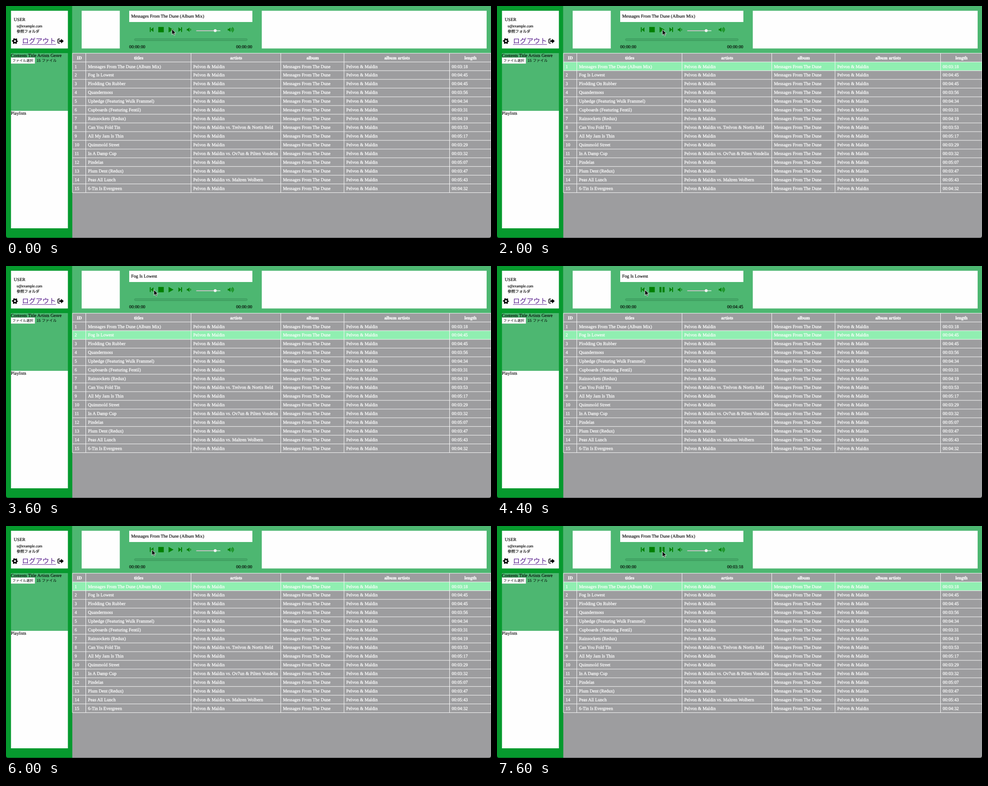
Recreate the animation shown at these times as an HTML page. Size 1000 by 478 pixels, loop 7.7 s.

```html
<!DOCTYPE html>
<html lang="ja">
<head>
<meta charset="utf-8">
<title>Music player</title>
<style>
  html, body { margin: 0; width: 100%; height: 100%; overflow: hidden; background: #9d9d9f; }
  svg { display: block; width: 100vw; height: 100vh; }
  text {
    font: 9.36px "Liberation Serif", "Noto Sans CJK JP", "Noto Sans CJK", serif;
    text-rendering: geometricPrecision;
    white-space: pre;
    stroke: #000;
    stroke-width: .15;
  }
  .small { font-size: 7.8px; }
  .link { font-size: 14.04px; font-weight: 300; fill: #551a8b; stroke: none; }
  .ui { font-family: "Liberation Sans", "Noto Sans CJK JP", "Noto Sans CJK", sans-serif; font-size: 7.7px; stroke: none; }
  #table text { fill: #fff; stroke: #fff; stroke-width: .25; }
  #table .head { font-weight: bold; text-anchor: middle; }
  #icons { fill: #008000; }
  #cursor { animation: move 7.7s infinite ease-in-out; }
  @keyframes move {
    0%     { transform: translate(342px, 47.5px); }
    13%    { transform: translate(341px, 48.5px); }
    29.9%  { transform: translate(341px, 48.5px); }
    35%    { transform: translate(357px, 50.5px); }
    39%    { transform: translate(357px, 50.5px); }
    45.5%  { transform: translate(305px, 49px); }
    58.4%  { transform: translate(305px, 49px); }
    67.5%  { transform: translate(301.5px, 48.5px); }
    87%    { transform: translate(300px, 49px); }
    91%    { transform: translate(300px, 49px); }
    97.4%, 100% { transform: translate(341px, 52px); }
  }
</style>
</head>
<body>
<svg viewBox="0 0 1000 478" preserveAspectRatio="none">
  <rect width="1000" height="478" fill="#9d9d9f"/>
  <rect width="136.7" height="478" fill="#069a2e"/>
  <rect x="136.7" width="863.3" height="97" fill="#4db771"/>
  <rect x="10.3" y="97" width="117.3" height="119" fill="#4db771"/>
  <g fill="#fefefe">
    <rect x="10.3" y="9.8" width="117.3" height="77.7"/>
    <rect x="156" y="9.8" width="78.6" height="77.7"/>
    <rect x="254" y="9.8" width="254" height="23.2"/>
    <rect x="527.4" y="9.8" width="463.6" height="77.7"/>
    <rect x="10.3" y="216" width="117.3" height="242"/>
  </g>

  <text x="16" y="31">USER</text>
  <text x="22" y="44.3" class="small">u@example.com</text>
  <text x="22" y="55.3" class="small">参照フォルダ</text>
  <text x="33" y="77.3" class="link">ログアウト</text>
  <path d="M33 79.3h70" stroke="#551a8b" stroke-width=".9"/>
  <g transform="translate(18.5 72.3)">
    <circle r="3.4" fill="none" stroke="#000" stroke-width="2.8"/>
    <circle r="5.2" fill="none" stroke="#000" stroke-width="2" stroke-dasharray="2.72" stroke-dashoffset="1.36"/>
  </g>
  <path d="M111 68h-2.6q-1.4 0-1.4 1.4v5.8q0 1.4 1.4 1.4h2.6" fill="none" stroke="#000" stroke-width="1.5"/>
  <path d="M109.5 70.6h4v-3.2l5.5 4.9-5.5 4.9v-3.2h-4z"/>

  <text x="10" y="104.7">Contents Title Artists Genre</text>
  <rect x="10.3" y="106.3" width="49" height="12.4" fill="#fff" stroke="#c4c4c4" stroke-width=".6"/>
  <text x="13" y="115.3" class="ui" style="font-size:7.2px">ファイル選択</text>
  <text x="63" y="115.3" class="ui">15 ファイル</text>
  <text x="10" y="224">Playlists</text>

  <text id="title" x="258" y="24.3"></text>
  <text id="now" x="254" y="87.3"></text>
  <text id="total" x="474.5" y="87.3"></text>
  <g id="icons">
    <path d="M296.5 43.8h2v9.8h-2zM304 43.8v9.8l-5.5-4.9z"/>
    <rect x="314" y="43.2" width="11.3" height="11"/>
    <path id="play" d="M335.2 43l10.3 5.7-10.3 5.8z"/>
    <path id="pause" d="M335 43.2h4.1v11H335zM341.4 43.2h4.1v11h-4.1z"/>
    <path d="M355.5 43.8l5.5 4.9-5.5 4.9zM361 43.8h2v9.8h-2z"/>
    <path id="horn" d="M372.8 47h2.4l3-2.8v9.2l-3-2.8h-2.4z"/>
    <use href="#horn" x="84.4"/>
    <g fill="none" stroke="#008000" stroke-width="1.1" stroke-linecap="round">
      <path d="M380 47q2.2 1.8 0 3.6M464.2 47q2.2 1.8 0 3.6M465.5 45.4q4 3.3 0 6.8M466.8 43.8q5.4 4.8 0 10"/>
    </g>
  </g>
  <path d="M393 51h38" stroke="#e3c4d8" stroke-width="1.7" stroke-linecap="round"/>
  <path d="M431 51h10.5" stroke="#d5e6db" stroke-width="1.5" stroke-linecap="round"/>
  <circle cx="431.3" cy="50.7" r="2.9" fill="#fdf5fa"/>
  <rect x="264.8" y="67.2" width="232.6" height="4.2" rx="2" fill="#44a967" stroke="#3a945a" stroke-width=".8"/>

  <g id="table"></g>
  <rect y="477" width="1000" height="1" opacity=".4"/>
  <path d="M0 473q0 5 5 5H0zM1000 473q0 5-5 5h5z"/>
  <g id="cursor">
    <path d="M0 0v11.6l2.7-2.5 1.8 4.1 1.9-.8-1.8-4h3.7z" fill="#000" stroke="#fff" stroke-width=".8"/>
  </g>
</svg>
<script>
const LOOP = 7700, TOP = 97, ROW = 17.95, HEAD = 18.3;
const BAND = "Pelvon & Maldin", ALBUM = "Messages From The Dune";
const edges = [137, 164.5, 381.5, 566.5, 697, 914.5, 1000];
const heads = ["ID", "titles", "artists", "album", "album artists", "length"];
const tracks = [
  [ALBUM + " (Album Mix)", "03:18"],
  ["Fog Is Lowest", "04:45"],
  ["Plodding On Rubber", "04:45"],
  ["Quandermoss", "03:56"],
  ["Uphedge (Featuring Wulk Frammel)", "04:34"],
  ["Cupboards (Featuring Fentil)", "03:31"],
  ["Rainsockets (Redux)", "04:19"],
  ["Can You Fold Tin", "03:53", "Trelvon & Nortis Beld"],
  ["All My Jam Is Thin", "05:17"],
  ["Quimmold Street", "03:29"],
  ["In A Damp Cup", "03:32", "Ov7un & Pilten Vondelia"],
  ["Pindelas", "05:07"],
  ["Plum Dent (Redux)", "03:47"],
  ["Peas All Lunch", "05:43", "Maltren Wolbern"],
  ["6-Tin Is Evergreen", "04:32"]
];

const $ = id => document.getElementById(id);
function add(tag, attrs, text = "") {
  const el = document.createElementNS("http://www.w3.org/2000/svg", tag);
  for (const key in attrs) el.setAttribute(key, attrs[key]);
  el.textContent = text;
  return $("table").appendChild(el);
}

const rowTop = i => TOP + HEAD + i * ROW;
const bottom = rowTop(tracks.length);
const mark = add("rect", { x: 137, width: 863, height: ROW, fill: "#90efb1" });

let lines = `M137 ${TOP + .3}H1000`;
for (let i = 0; i <= tracks.length; i++) lines += `M137 ${rowTop(i)}H1000`;
for (const x of edges) lines += `M${x} ${TOP}V${bottom}`;
add("path", { d: lines, stroke: "#f4f4f4", "stroke-width": 1 });

heads.forEach((name, i) =>
  add("text", { x: (edges[i] + edges[i + 1]) / 2 + .5, y: 109.5, class: "head" }, name));
tracks.forEach(([title, length, guest], i) => {
  const artists = guest ? `${BAND} vs. ${guest}` : BAND;
  [i + 1, title, artists, ALBUM, BAND, "00:" + length].forEach((value, c) =>
    add("text", { x: edges[c] + 4.5, y: rowTop(i) + 12.2 }, value));
});

// [click time, track, time when playback begins]
const plays = [[900, 0, 2100], [3000, 1, 4200], [5500, 0, 6700]];
const start = performance.now();

function draw() {
  const t = Math.floor((performance.now() - start) % LOOP / 100) * 100;
  const current = plays.filter(p => p[0] <= t).pop();
  const [, index, begin] = current || [0, 0, LOOP];
  const playing = t >= begin;
  const seconds = playing ? Math.floor((t - begin) / 1000) : 0;

  mark.setAttribute("visibility", current ? "visible" : "hidden");
  mark.setAttribute("y", rowTop(index));
  $("title").textContent = tracks[index][0];
  $("now").textContent = "00:00:" + String(seconds).padStart(2, "0");
  $("total").textContent = "00:" + (playing ? tracks[index][1] : "00:00");
  $("play").setAttribute("visibility", playing ? "hidden" : "visible");
  $("pause").setAttribute("visibility", playing ? "visible" : "hidden");
  requestAnimationFrame(draw);
}
draw();
</script>
</body>
</html>
```
